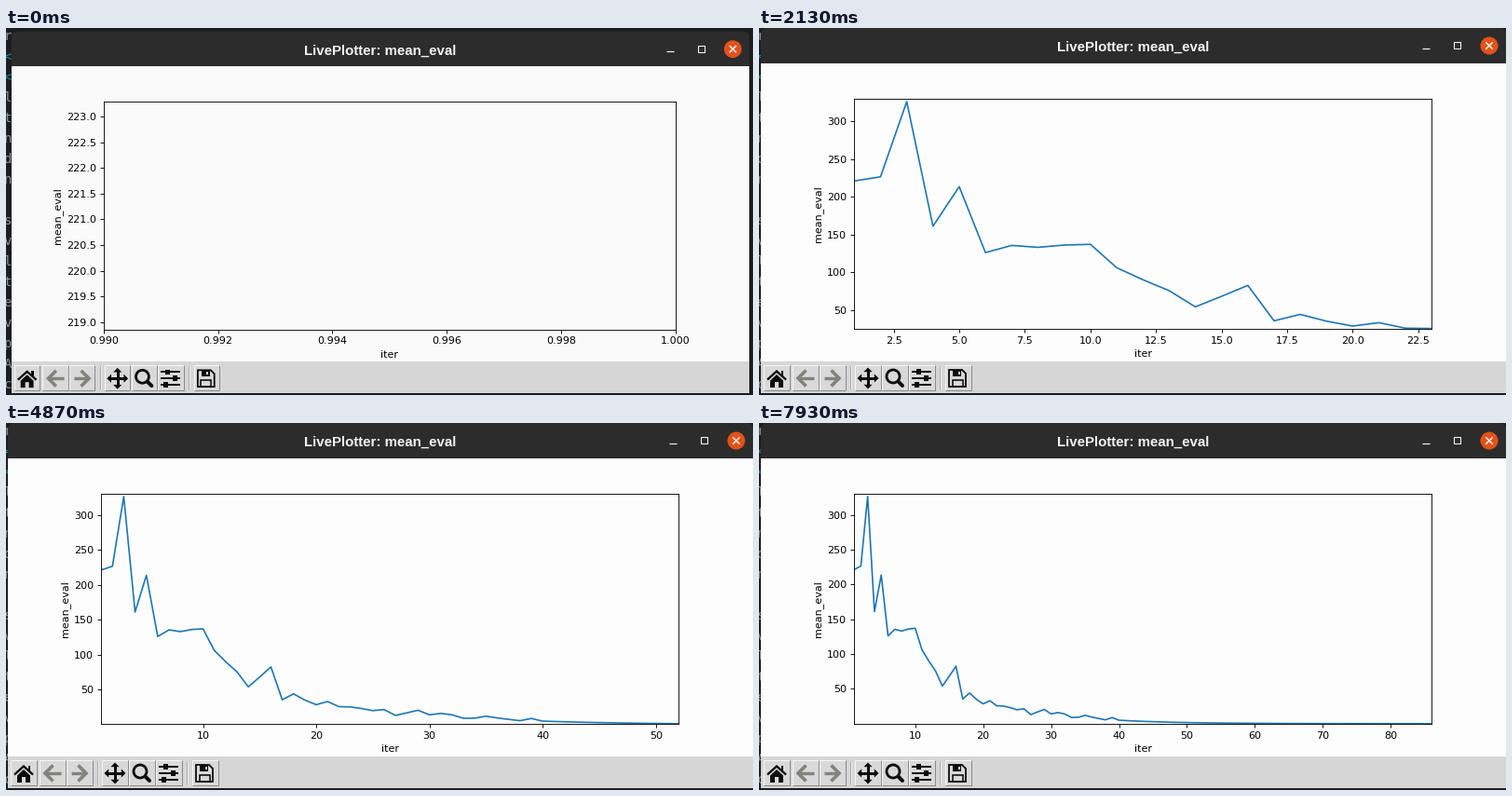
Animation, 802 px wide and 394 px high, one loop 8 s. Source, as a matplotlib script:

```python
import math

import matplotlib.pyplot as plt
from matplotlib.animation import FuncAnimation
from matplotlib.patches import Circle, FancyBboxPatch, Polygon, Rectangle
from matplotlib.lines import Line2D
from matplotlib.transforms import Affine2D

W, H, DPI = 802, 394, 80
PX = 72 / DPI                      # points per pixel
FRAMES, INTERVAL = 200, 40
RATE, LAG = 10.94, 0.17            # iterations per second, start delay
OPENING = 0.07                     # seconds until the window is full size
START_SCALE = 0.9905

DARK, BAR, PANEL, TOOLS = '#1b1d1e', '#2c2c2c', '#fdfdfd', '#d6d6d6'
INK, GREY, LIGHT = '#0c0c0c', '#83837d', '#f2f2f2'

values = [221.07, 226.5, 326.3, 161, 213.5, 126, 135.5, 133, 136, 137,
          106, 90, 75.5, 54, 68, 82.5, 35.5, 44, 35, 28.5,
          33, 25.7, 25.3, 23, 20, 21.5, 13.1, 16.8, 20.5, 14,
          16, 14, 9, 9.2, 12, 9.5, 7.5, 5.6, 8.8, 5]
values += [5 * math.exp(-0.11 * i) for i in range(1, 51)]

fig = plt.figure(figsize=(W / DPI, H / DPI), dpi=DPI, facecolor=DARK)
stage = fig.add_axes([0, 0, 1, 1])
stage.set_xlim(0, W)
stage.set_ylim(H, 0)
stage.axis('off')
zoom = Affine2D()
window = zoom + stage.transData


def add(artist):
    artist.set_transform(window)
    stage.add_artist(artist)
    return artist


def rect(x0, y0, x1, y1, color):
    return add(Rectangle((x0, y0), x1 - x0, y1 - y0, fc=color, lw=0))


def poly(points, color=INK):
    return add(Polygon(points, closed=True, fc=color, lw=0))


def line(points, color=INK, width=1.0, cap='butt'):
    xs, ys = zip(*points)
    return add(Line2D(xs, ys, color=color, lw=width * PX,
                      solid_capstyle=cap, solid_joinstyle='miter'))


def ring(x, y, r, color=INK, width=1.0):
    return add(Circle((x, y), r, fill=False, ec=color, lw=width * PX))


def terminal():
    """Slivers of text behind the left edge of the window."""
    rows = ['r', '<', '<', 'l', 't', 'n', 'd', 'n', '', 's', 'v', 'l',
            't', 'e', 'v', 'p', 'A', 'c']
    for i, char in enumerate(rows):
        color = '#2a87a0' if char == '<' else '#8c9292'
        stage.text(-2.5, 13 + 22 * i, char, family='DejaVu Sans Mono',
                   size=14 * PX, color=color, va='baseline', zorder=0.5)


def title_bar():
    add(FancyBboxPatch((2, 0), 800, 60, fc=BAR, lw=0,
                       boxstyle='round,pad=0,rounding_size=7'))
    stage.text(402, 24.8, 'LivePlotter: mean_eval', transform=window,
               family='Liberation Sans', weight='bold', size=15 * PX,
               color=LIGHT, ha='center', va='baseline')
    line([(712, 21.5), (720, 21.5)], LIGHT, 1.2)
    add(Rectangle((746, 15), 7, 7, fill=False, ec=LIGHT, lw=1.1 * PX))
    add(Circle((784, 19), 9.5, fc='#e4521b', lw=0))
    for d in (-1, 1):
        line([(780.3, 19 - 3.7 * d), (787.7, 19 + 3.7 * d)], 'white', 1.4)


def button(x):
    rect(x, 362, x + 28, 389, '#d9d9d9')
    line([(x, 389), (x, 362), (x + 28, 362)], '#f6f6f6')
    line([(x, 388.5), (x + 27.5, 388.5), (x + 27.5, 362)], '#8a8a8a')


def home(x, y):
    line([(x - 10, y + 1.5), (x, y - 7.5), (x + 10, y + 1.5)], INK, 2.3)
    poly([(x + a, y + b) for a, b in
          [(-7, 2.5), (0, -4), (7, 2.5), (7, 10), (2, 10), (2, 4),
           (-2, 4), (-2, 10), (-7, 10)]])
    rect(x + 4.5, y - 8, x + 7, y - 2, INK)


def arrow(x, y, d):
    line([(x + 9 * d, y), (x - 7 * d, y)], GREY, 3.4)
    line([(x + d, y - 8.5), (x - 7.5 * d, y), (x + d, y + 8.5)], GREY, 3.6)


def pan(x, y):
    line([(x - 9, y), (x + 9, y)], INK, 3)
    line([(x, y - 9), (x, y + 9)], INK, 3)
    for ux, uy in [(1, 0), (-1, 0), (0, 1), (0, -1)]:
        tip = (x + 11.5 * ux, y + 11.5 * uy)
        bx, by = x + 6.8 * ux, y + 6.8 * uy
        poly([tip, (bx - 4.6 * uy, by + 4.6 * ux),
              (bx + 4.6 * uy, by - 4.6 * ux)])


def lens(x, y):
    ring(x - 1.5, y - 2, 7, INK, 2.8)
    line([(x + 4, y + 3.5), (x + 8.5, y + 8)], INK, 4, 'round')


def sliders(x, y):
    for dy, knob in [(-7, -3), (0, 5), (7, -5)]:
        line([(x - 10.5, y + dy), (x + 10.5, y + dy)], INK, 2)
        rect(x + knob - 2.5, y + dy - 2.8, x + knob + 2.5, y + dy + 2.8, INK)


def floppy(x, y):
    outline = [(-9, -9), (5, -9), (9, -5), (9, 9), (-9, 9)]
    add(Polygon([(x + a, y + b) for a, b in outline], fill=False,
                ec=INK, lw=1.8 * PX))
    rect(x - 5, y - 9, x + 4, y - 2.5, INK)
    rect(x + 0.5, y - 7.5, x + 2.5, y - 4, TOOLS)
    add(Rectangle((x - 5.5, y + 2), 11, 7, fill=False, ec=INK, lw=1.6 * PX))


def toolbar():
    rect(2, 358, 802, 392, TOOLS)
    for x in (5, 36, 65, 103, 132, 161, 200):
        button(x)
    for x in (98, 194):
        line([(x, 363), (x, 388)], '#ababab')
        line([(x + 1, 363), (x + 1, 388)], '#efefef')
    home(19, 376)
    arrow(49.5, 376, 1)
    arrow(78.5, 376, -1)
    pan(117, 376)
    lens(145.5, 376)
    sliders(174, 376)
    floppy(213, 376)


terminal()
title_bar()
panel = rect(2, 38, 802, 358, PANEL)
toolbar()

plot = fig.add_axes([0.1, 0.2, 0.7, 0.6])
plot.set_facecolor('none')
plot.set_xlabel('iter')
plot.set_ylabel('mean_eval')
curve, = plot.plot([], [], color='#1f77b4', lw=1.5)


def place(scale):
    zoom.clear().scale(scale).translate(402 * (1 - scale), 401 * (1 - scale))
    x0, y0 = zoom.transform((102, 322.8))
    x1, y1 = zoom.transform((722, 76.4))
    plot.set_position([x0 / W, 1 - y0 / H, (x1 - x0) / W, (y0 - y1) / H])


def update(i):
    t = i * INTERVAL / 1000
    opening = t < OPENING
    place(START_SCALE if opening else 1)
    panel.set_facecolor('#fafafb' if opening else PANEL)

    n = max(1, int(RATE * t - LAG))
    seen = values[:n]
    curve.set_data(range(1, n + 1), seen)
    plot.set_xlim(0.99, n)
    plot.set_ylim(0.99 * min(seen), 1.01 * max(seen))
    return curve,


anim = FuncAnimation(fig, update, frames=FRAMES, interval=INTERVAL,
                     repeat=True, repeat_delay=0, blit=False)
plt.show()
```
